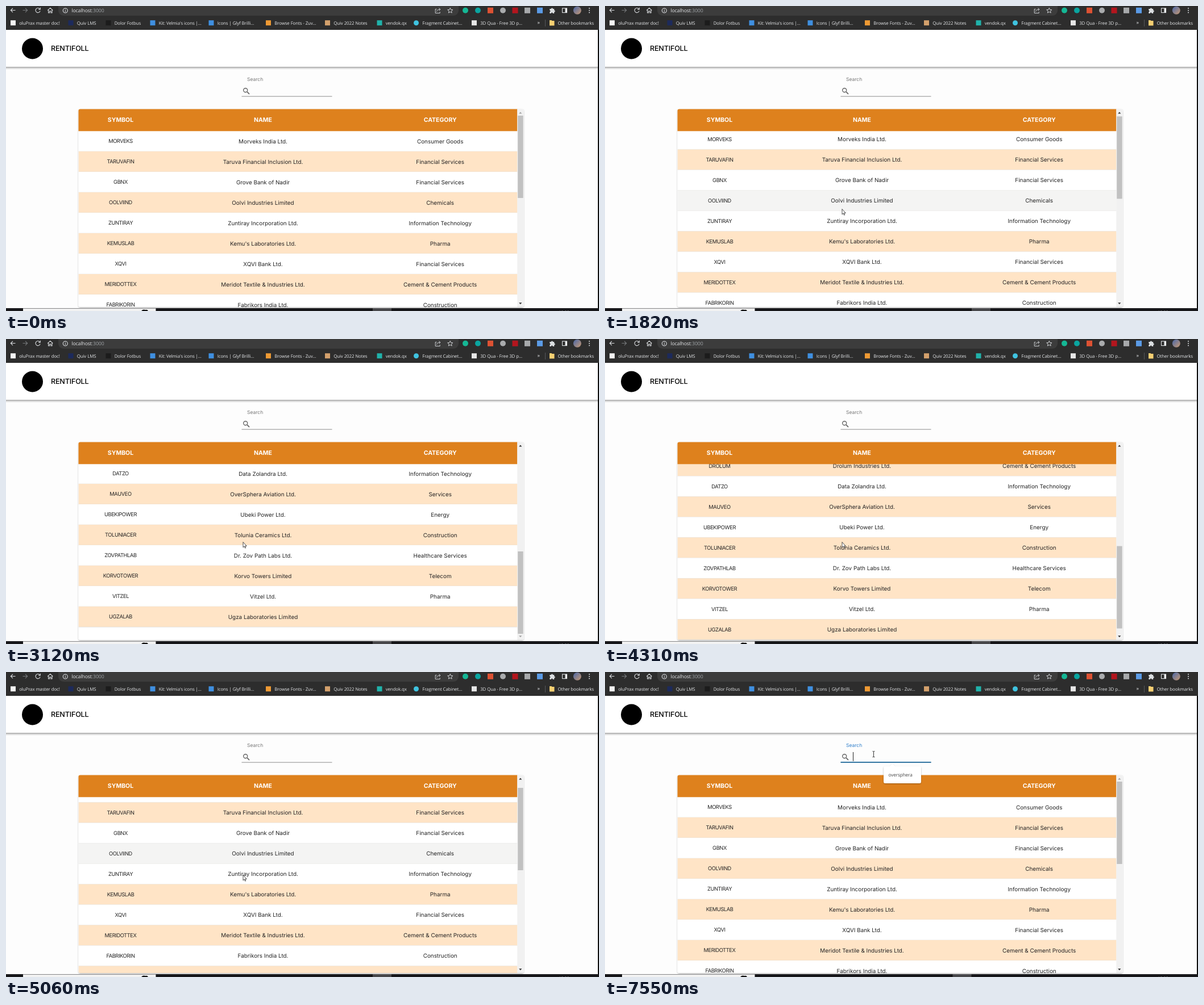
Animation of 1043x537 px, one loop 8000 ms. Source, as an HTML page:

```html
<!DOCTYPE html>
<html lang="en">
<head>
<meta charset="utf-8">
<title>Stock table</title>
<style>
  html, body { margin: 0; width: 100%; height: 100%; overflow: hidden; background: #fdfdfd; }
  svg { display: block; width: 1043px; height: 537px; }
  text { font-family: Inter, sans-serif; text-rendering: geometricPrecision; white-space: pre; }
  .cell { font-size: 9.9px; fill: #232323; text-anchor: middle; }
  .cell.sym { font-size: 9.3px; letter-spacing: -.4px; }
  .head { font-size: 10.5px; font-weight: 700; fill: #fff; text-anchor: middle; }
  .ui { font-family: "Open Sans", sans-serif; font-size: 7.9px; letter-spacing: -.1px; fill: #e4e6e8; }
  .line { fill: none; stroke: #dcdfe2; stroke-width: 1.1; }
</style>
</head>
<body>
<svg viewBox="0 0 1043 537" xmlns="http://www.w3.org/2000/svg">
  <defs>
    <clipPath id="body"><rect x="127.5" y="220" width="772" height="310"/></clipPath>
    <clipPath id="card"><rect x="127.5" y="181.5" width="783" height="348.5" rx="3"/></clipPath>
    <linearGradient id="drop" x1="0" y1="0" x2="0" y2="1">
      <stop offset="0" stop-color="#777"/><stop offset=".35" stop-color="#ccc"/><stop offset="1" stop-color="#fdfdfd"/>
    </linearGradient>
    <linearGradient id="avatar" x1="0" y1="0" x2="1" y2="1">
      <stop offset="0" stop-color="#4866a8"/><stop offset="1" stop-color="#c99a72"/>
    </linearGradient>
    <filter id="soft" x="-10%" y="-10%" width="120%" height="130%">
      <feDropShadow dx="0" dy="1" stdDeviation="1.1" flood-opacity=".32"/>
    </filter>
  </defs>

  <!-- page -->
  <rect width="1043" height="537" fill="#fdfdfd"/>
  <rect y="107" width="1041" height="5" fill="url(#drop)"/>
  <rect y="42" width="1041" height="65.3" fill="#fff"/>
  <circle cx="46.5" cy="75" r="18.5" fill="#000"/>
  <text x="79" y="79.3" font-size="12.6" font-weight="500" letter-spacing="-.2">RENTIFOLL</text>

  <!-- browser bars -->
  <rect width="1043" height="42" fill="#2d2d2d"/>
  <path d="M92 0H796V8a9 9 0 0 1-9 9H101a9 9 0 0 1-9-9Z" fill="#3c3c3c"/>
  <g class="line">
    <path d="M16.5 7.5H8.5M12 3.8L8.3 7.5L12 11.2"/>
    <path d="M29.5 7.5H37.5M34 3.8L37.7 7.5L34 11.2" stroke="#77797c"/>
    <path d="M59.3 5A4.1 4.1 0 1 0 60.1 8.6M60.3 2.8V5.9H57.2"/>
    <path d="M73.2 7.6L77.8 3.4L82.4 7.6M74.6 6.8V12H76.6V9H79V12H81V6.8"/>
    <circle cx="104.3" cy="8" r="4"/>
    <path d="M104.3 7.4V10.3M104.3 5.4V6.5"/>
    <path d="M757.5 5.5H755.2V12.5H763.2V10.2M757.5 9.8C758 7 760 6 763.5 6M761.5 3.7L764 6L761.5 8.3" stroke-width=".9"/>
    <path d="M781.3 3.4L782.6 6.4L785.9 6.7L783.4 8.9L784.2 12.1L781.3 10.4L778.4 12.1L779.2 8.9L776.7 6.7L780 6.4Z" stroke-width=".9"/>
    <rect x="978.5" y="4" width="8" height="7.6"/>
  </g>
  <path d="M983.5 4H987V11.6H983.5Z" fill="#eceef0"/>
  <path d="M956.3 5H958.8a1.6 1.6 0 0 1 3.2 0H964.2V7.4a1.6 1.6 0 0 1 0 3.2V13H961.7a1.4 1.4 0 0 0-2.8 0H956.3V10.4a1.5 1.5 0 0 0 0-2.9Z" fill="#dcdfe2"/>
  <circle cx="1004.8" cy="7.8" r="7" fill="url(#avatar)"/>
  <g fill="#dcdfe2"><circle cx="1026" cy="4" r="1"/><circle cx="1026" cy="7.8" r="1"/><circle cx="1026" cy="11.6" r="1"/></g>
  <text class="ui" x="115.3" y="11" style="font-size:8.7px">localhost<tspan fill="#a0a4a8">:3000</tspan></text>
  <g id="extensions"></g>
  <g id="bookmarks"></g>
  <text class="ui" x="934.5" y="32.4" style="font-size:9px">»</text>
  <path d="M948.5 24V36" stroke="#55585b"/>
  <path d="M956 25H959.5L960.5 26H964.5V34.5H956Z" fill="#f5cf72"/>
  <text class="ui" x="970.5" y="32.5">Other bookmarks</text>

  <!-- search field -->
  <text id="label" x="424" y="132" font-size="8.5">Search</text>
  <path d="M424.2 151.2L428 155.2" stroke="#666" stroke-width="1.7"/>
  <circle cx="421.2" cy="148.2" r="3.5" fill="none" stroke="#666" stroke-width="1.4"/>
  <rect x="414.5" y="158.6" width="159" height="1" fill="#8c8c8c"/>
  <rect id="accent" x="414.5" y="158" width="159" height="1.7" fill="#1b6a9f"/>
  <rect id="caret" x="436" y="141" width="1" height="16" fill="#222"/>

  <!-- table -->
  <rect x="127.5" y="181.5" width="783" height="348.5" rx="3" fill="#fff" filter="url(#soft)"/>
  <g clip-path="url(#card)">
    <g clip-path="url(#body)"><g id="rows"></g></g>
    <rect x="127" y="181" width="772.3" height="39.3" fill="#de811d"/>
    <text class="head" x="201.5" y="204.4">SYMBOL</text>
    <text class="head" x="452" y="204.4">NAME</text>
    <text class="head" x="763.7" y="204.4">CATEGORY</text>
    <rect x="899.3" y="181" width="12" height="350" fill="#f1f1f1"/>
    <rect id="thumb" x="900.2" y="193" width="9.4" height="145" fill="#c1c1c1"/>
    <path id="up" d="M902.2 189.5L904.8 186.5L907.4 189.5Z"/>
    <path id="down" d="M902.2 522.3L904.8 525.3L907.4 522.3Z"/>
  </g>

  <!-- suggestion -->
  <g id="hint">
    <path d="M493 166H501L505.5 161.5L510 166H553Q556 166 556 169V193Q556 196 553 196H493Q490 196 490 193V169Q490 166 493 166Z" fill="#fff" filter="url(#soft)"/>
    <text class="ui" x="498.5" y="184.2" style="fill:#444;font-size:8.2px">oversphera</text>
  </g>

  <!-- taskbar and window edge -->
  <rect x="1041" y="42" width="2" height="495" fill="#0c0c0c"/>
  <rect y="532" width="1043" height="5" fill="#17171a"/>
  <rect x="30" y="532.5" width="233.5" height="4.5" fill="#f3f3f3"/>
  <path d="M238 537Q241 533.5 245 535Q249 534 250 537Z" fill="#111"/>
  <rect id="task" y="532" width="33" height="5" fill="#48484b"/>
  <text class="ui" x="972" y="542" style="font-size:7.5px">10:00</text>

  <!-- pointers -->
  <path id="arrow" d="M0 0V9.4L2.1 7.5L3.5 10.7L4.9 10.1L3.5 7H6.3Z" fill="#fff" stroke="#222" stroke-width=".8"/>
  <path id="beam" d="M-2-5H-.6Q0-5 0-4.3V4.3Q0 5-.6 5H-2M2-5H.6Q0-5 0-4.3M0 4.3Q0 5 .6 5H2" fill="none" stroke="#222" stroke-width=".9"/>
</svg>

<script>
const $ = id => document.getElementById(id);
const ROW = 36, TOP = 220, MAX_SCROLL = 433, LOOP = 8000;

function add(parent, tag, attrs, text) {
  const el = document.createElementNS('http://www.w3.org/2000/svg', tag);
  for (const key in attrs) el.setAttribute(key, attrs[key]);
  if (text) el.textContent = text;
  return parent.appendChild(el);
}

function mark(parent, shape, x, y, size, fill) {
  if (shape === 'o') add(parent, 'circle', { cx: x, cy: y, r: size / 2, fill });
  else add(parent, 'rect', { x: x - size / 2, y: y - size / 2, width: size, height: size, fill });
}

[
  [808, 'o', '#15b795'], [830, 'o', '#0aa5a0'], [852, 's', '#dd5233'], [874, 'o', '#a9abad'],
  [895.5, 's', '#b3161e'], [917, 's', '#a7a9ab'], [939, 's', '#5b9be6']
].forEach(([x, shape, fill]) => mark($('extensions'), shape, x, 7.8, 10, fill));

[
  [12.5, 's', '#f4f4f4', 'oluPrax master doc!'],
  [114, 's', '#1d2a5c', 'Quiv LMS'],
  [180, 's', '#1c1c1c', 'Dolor Fotbus'],
  [258, 's', '#3f8fe0', "Kit: Velmia's icons |..."],
  [361, 's', '#3f8fe0', 'Icons | Glyf Brilli...'],
  [461.5, 's', '#ee9a34', 'Browse Fonts - Zuv...'],
  [565.5, 's', '#d3a06c', 'Quiv 2022 Notes'],
  [657, 's', '#20b2aa', 'vendok.qx'],
  [721.5, 'o', '#3fc3e0', 'Fragment Cabinet...'],
  [823.5, 's', '#e6e6e6', '3D Qua - Free 3D p...']
].forEach(([x, shape, fill, name]) => {
  mark($('bookmarks'), shape, x, 29.7, 9, fill);
  add($('bookmarks'), 'text', { class: 'ui', x: x + 10.7, y: 32.5 }, name);
});

const rows = `MORVEKS;Morveks India Ltd.;Consumer Goods
TARUVAFIN;Taruva Financial Inclusion Ltd.;Financial Services
GBNX;Grove Bank of Nadir;Financial Services
OOLVIIND;Oolvi Industries Limited;Chemicals
ZUNTIRAY;Zuntiray Incorporation Ltd.;Information Technology
KEMUSLAB;Kemu's Laboratories Ltd.;Pharma
XQVI;XQVI Bank Ltd.;Financial Services
MERIDOTTEX;Meridot Textile & Industries Ltd.;Cement & Cement Products
FABRIKORIN;Fabrikors India Ltd.;Construction
VELDRPOWER;Veldrin Power Ltd.;Energy
PVSX;Pelvor Financial Services Software Ltd.;Information Technology
DROLUM;Drolum Industries Ltd.;Cement & Cement Products
DATZO;Data Zolandra Ltd.;Information Technology
MAUVEO;OverSphera Aviation Ltd.;Services
UBEKIPOWER;Ubeki Power Ltd.;Energy
TOLUNIACER;Tolunia Ceramics Ltd.;Construction
ZOVPATHLAB;Dr. Zov Path Labs Ltd.;Healthcare Services
KORVOTOWER;Korvo Towers Limited;Telecom
VITZEL;Vitzel Ltd.;Pharma
UGZALAB;Ugza Laboratories Limited;`.split('\n').map((line, i) => {
  const y = TOP + i * ROW;
  const [symbol, name, category] = line.split(';');
  const bg = add($('rows'), 'rect', { x: 127, y, width: 773, height: ROW });
  add($('rows'), 'rect', { x: 127, y: y + ROW - .3, width: 773, height: .8, fill: '#dedcda' });
  add($('rows'), 'text', { class: 'cell sym', x: 201.5, y: y + 21.4 }, symbol);
  add($('rows'), 'text', { class: 'cell', x: 452, y: y + 21.5 }, name);
  add($('rows'), 'text', { class: 'cell', x: 763.7, y: y + 21.5 }, category);
  return bg;
});

// bursts of screen updates: start, end, number of steps
const bursts = [
  [420, 1220, 13], [1290, 1620, 6], [1820, 1820, 1], [2040, 2380, 6], [2840, 3120, 5],
  [4310, 4730, 7], [4920, 5190, 5], [5520, 6070, 9], [6270, 6740, 7], [7070, 7070, 1], [7550, 7550, 1]
];
const scrollKeys = [
  [1750, 0], [1820, 3.3], [1972, 3.3], [2040, 20], [2176, 145], [2312, 250], [2380, 272],
  [2770, 272], [2840, 300], [2980, 395], [3050, 424], [3120, MAX_SCROLL],
  [4240, MAX_SCROLL], [4310, 410.5], [4380, 365], [4520, 255], [4660, 178], [4730, 161],
  [4852, 161], [4920, 135], [5055, 26.3], [5122, 7], [5190, 0]
];
const pointerKeys = [
  [420, 954, 478], [640, 850, 330], [900, 700, 190], [1000, 672, 172], [1220, 624, 212],
  [1290, 590, 240], [1450, 465, 335], [1620, 417, 357.5],
  [5450, 417, 357.5], [5520, 418, 348], [5800, 445, 230], [6000, 468, 155], [6070, 472.5, 144.7]
];

function held(t) {
  const burst = bursts.filter(b => b[0] <= t).pop();
  if (!burst) return 0;
  const [start, end, count] = burst;
  if (t >= end) return end;
  const step = (end - start) / (count - 1);
  return start + Math.floor((t - start) / step + 1e-6) * step;
}

function sample(keys, t) {
  const next = keys.findIndex(k => k[0] > t);
  if (next < 0) return keys[keys.length - 1].slice(1);
  if (next === 0) return keys[0].slice(1);
  const a = keys[next - 1], b = keys[next];
  const p = (t - a[0]) / (b[0] - a[0]);
  return a.slice(1).map((v, i) => v + (b[i + 1] - v) * p);
}

const show = (el, on) => el.setAttribute('visibility', on ? 'visible' : 'hidden');

function render(time) {
  const t = held(time);
  const [scroll] = sample(scrollKeys, t);
  const [x, y] = sample(pointerKeys, t);
  const present = t >= 420;

  $('rows').setAttribute('transform', `translate(0 ${-scroll})`);
  $('thumb').setAttribute('y', 193 + scroll * 181 / MAX_SCROLL);
  $('up').setAttribute('fill', scroll > 0 ? '#333' : '#a3a3a3');
  $('down').setAttribute('fill', scroll < MAX_SCROLL ? '#333' : '#a3a3a3');

  // the hovered row stays the same while only the wheel moves
  const hover = present && x < 899 ? Math.floor((y - TOP) / ROW) : -1;
  rows.forEach((bg, i) => bg.setAttribute('fill', i === hover ? '#f4f4f3' : i % 2 ? '#ffe4c6' : '#fff'));

  const overInput = x > 433 && x < 573 && y > 138 && y < 159;
  show($('arrow'), present && !overInput);
  show($('beam'), present && overInput);
  for (const id of ['arrow', 'beam']) $(id).setAttribute('transform', `translate(${x} ${y})`);

  const focus = Math.min(1, Math.max(0, (t - 6450) / 200));
  const grow = 1 - (1 - focus) ** 2;
  $('label').setAttribute('fill', focus ? '#2f7fcb' : '#777');
  $('accent').setAttribute('x', 494 - 79.5 * grow);
  $('accent').setAttribute('width', 159 * grow);
  show($('caret'), t >= 6570 && (t < 7070 || t >= 7550));
  $('hint').setAttribute('opacity', Math.min(1, Math.max(0, (t - 6500) / 160)));
  $('task').setAttribute('x', t < 6270 ? 645 : 611.5);
}

function tick(now) {
  render(now % LOOP);
  requestAnimationFrame(tick);
}
render(0);
requestAnimationFrame(tick);
</script>
</body>
</html>
```
